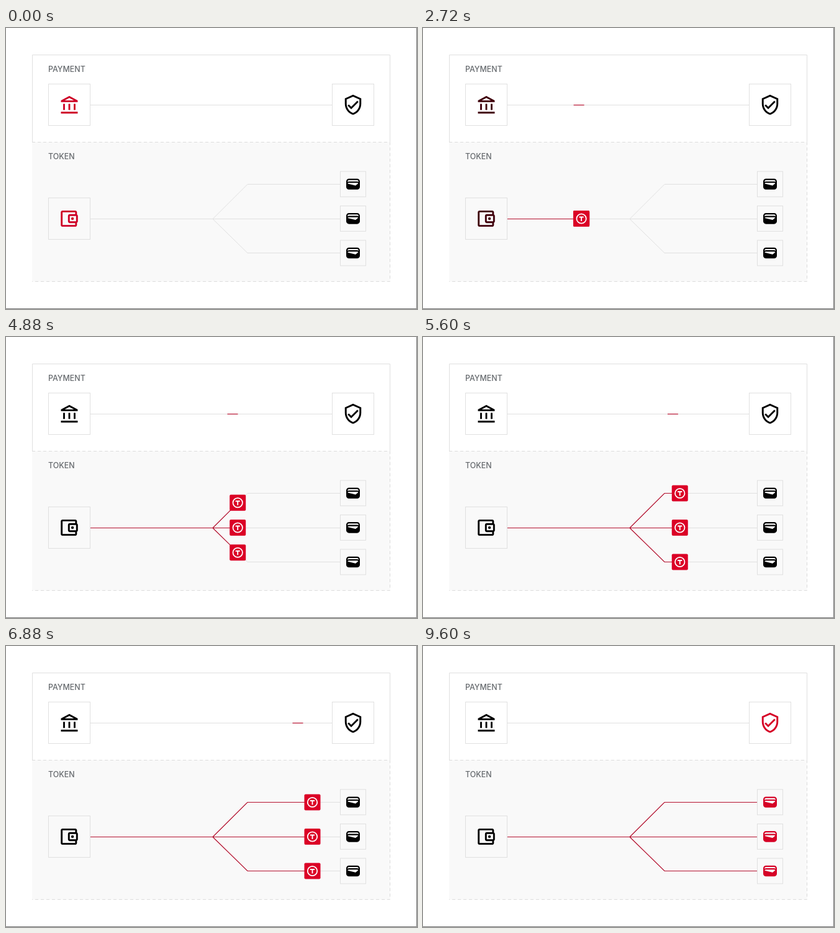
An HTML page that plays this animation: 662x454 px, repeating every 9.68 s.

```html
<!DOCTYPE html>
<html lang="en">
<head>
<meta charset="utf-8">
<title>Payment and token flow</title>
<style>
  html, body { margin: 0; width: 100%; height: 100%; overflow: hidden; background: #fff; }
  svg { display: block; width: 662px; height: 454px; }
  text { font: 500 12.4px Inter, Roboto, sans-serif; fill: #666a6e; }
  .rule { fill: none; stroke: #e0e0e0; }
  .dashed { fill: none; stroke: #dcdcdc; stroke-dasharray: 5 4; }
  .hot { fill: none; stroke: #b4102e; stroke-width: 1.2; }
  .box { fill: #fff; stroke: #e0e0e0; }
  .soft { fill: #f9f9f9; }
  .edge { fill: none; stroke: #777; }
</style>
</head>
<body>
<svg viewBox="0 0 662 454" xmlns="http://www.w3.org/2000/svg">
  <defs>
    <clipPath id="trail"><rect id="reach" y="200" width="0" height="220"/></clipPath>
    <path id="branches" d="M136 308.5H538M333 308.5L389 252.5H538M333 308.5L389 363.5H538"/>
    <g id="token">
      <rect x="-13" y="-13" width="26" height="26" rx="2" fill="#db0026"/>
      <circle r="7.7" fill="none" stroke="#fff" stroke-width="1.8"/>
      <path d="M-3.6-2.5H3.6M0-2.5V4" fill="none" stroke="#fff" stroke-width="1.9"/>
    </g>
    <g id="card">
      <rect class="box soft" x="-20.5" y="-20.5" width="41" height="41"/>
      <path transform="scale(1.1) translate(-12 -12)" d="M18 4H6C3.79 4 2 5.79 2 8v8c0 2.21 1.79 4 4 4h12c2.21 0 4-1.79 4-4V8c0-2.21-1.79-4-4-4zm-1.86 9.77c-.24.2-.57.28-.88.2L4.15 11.25C4.45 10.52 5.16 10 6 10h12c.67 0 1.26.34 1.63.84l-3.49 2.93zM6 6h12c1.1 0 2 .9 2 2v.55c-.59-.34-1.27-.55-2-.55H6c-.73 0-1.41.21-2 .55V8c0-1.1.9-2 2-2z"/>
    </g>
  </defs>

  <rect width="662" height="454" fill="#fff"/>
  <path class="edge" d="M661.5 0V453.5H0"/>

  <rect class="soft" x="42" y="184" width="577" height="226"/>
  <path class="rule" d="M42.5 184V43.5H618.5V184"/>
  <path class="dashed" d="M42 184.5H618.5V409.5H42"/>
  <text x="68" y="71">PAYMENT</text>
  <text x="68" y="212">TOKEN</text>

  <path class="rule" d="M136 124.5H525"/>
  <path class="hot" id="dash" d="M0 124.5h17"/>
  <use href="#branches" class="rule"/>
  <g clip-path="url(#trail)"><use href="#branches" class="hot"/></g>
  <use href="#token" class="token"/>
  <use href="#token" class="token"/>
  <use href="#token" class="token"/>

  <rect class="box" x="68.5" y="90.5" width="67" height="67"/>
  <rect class="box" x="525.5" y="90.5" width="67" height="67"/>
  <rect class="box soft" x="68.5" y="274.5" width="67" height="67"/>

  <g id="senders">
    <path transform="translate(102 124) scale(1.42) translate(-11.5 -11)" d="M6.5 10h-2v7h2v-7zm6 0h-2v7h2v-7zm8.5 9H2v2h19v-2zm-2.5-9h-2v7h2v-7zm-7-6.74L16.71 6H6.29l5.21-2.74m0-2.26L2 6v2h19V6l-9.5-5z"/>
    <g transform="translate(102 308) scale(1.45) translate(-12.5 -12)">
      <path d="M21 7.28V5c0-1.1-.9-2-2-2H5c-1.11 0-2 .9-2 2v14c0 1.1.89 2 2 2h14c1.1 0 2-.9 2-2v-2.28c.59-.35 1-.98 1-1.72V9c0-.74-.41-1.37-1-1.72zM20 9v6h-7V9h7zM5 19V5h14v2h-6c-1.1 0-2 .9-2 2v6c0 1.1.9 2 2 2h6v2H5z"/>
      <circle cx="16" cy="12" r="1.5"/>
    </g>
  </g>
  <g id="receivers">
    <path transform="translate(559 124) scale(1.47) translate(-12 -12)" d="M12 1L3 5v6c0 5.55 3.84 10.74 9 12 5.16-1.26 9-6.45 9-12V5l-9-4zm0 2.18l7 3.12v4.7c0 4.52-2.98 8.69-7 9.93-4.02-1.24-7-5.41-7-9.93V6.3l7-3.12zM7.41 11.59L6 13l4 4 8-8-1.41-1.42L10 14.17z"/>
    <use href="#card" x="559" y="252.3"/>
    <use href="#card" x="559" y="307.9"/>
    <use href="#card" x="559" y="363.5"/>
  </g>
</svg>
<script>
  const LOOP = 9680, TICK = 80, FORK = 333, RISE = 55.5;
  const $ = id => document.getElementById(id);
  const tokens = document.querySelectorAll('.token');

  // Each track is a list of [time, value], joined by straight lines.
  const tokenX = [[320, 114.5], [1360, 175.5], [4050, 333], [5195, 388.5], [7931, 559]];
  const dashX = [[320, 111.5], [1360, 168.5], [2720, 242.6], [4880, 356.5], [6320, 431.3], [7520, 496], [8160, 530]];
  const senderHeat = [[320, 1], [3800, 0]];
  const receiverHeat = [[8320, 0], [8960, 1]];

  function at(track, t) {
    const i = track.findIndex(([time]) => time > t);
    if (i === 0) return track[0][1];
    if (i < 0) return track[track.length - 1][1];
    const [t0, v0] = track[i - 1], [t1, v1] = track[i];
    return v0 + (v1 - v0) * (t - t0) / (t1 - t0);
  }

  const red = (heat, r, b) => `rgb(${Math.round(r * heat)},0,${Math.round(b * heat)})`;

  function draw(t) {
    const x = at(tokenX, t);
    const spread = Math.min(Math.max(x - FORK, 0), RISE);
    tokens.forEach((token, i) =>
      token.setAttribute('transform', `translate(${x} ${308 + (i - 1) * spread})`));
    $('reach').setAttribute('width', x);
    $('dash').setAttribute('transform', `translate(${at(dashX, t)} 0)`);
    $('senders').setAttribute('fill', red(at(senderHeat, t), 206, 38));
    $('receivers').setAttribute('fill', red(at(receiverHeat, t), 214, 38));
  }

  const start = performance.now();
  function frame() {
    const t = (performance.now() - start) % LOOP;
    draw(Math.floor(t / TICK) * TICK);
    requestAnimationFrame(frame);
  }
  frame();
</script>
</body>
</html>
```
